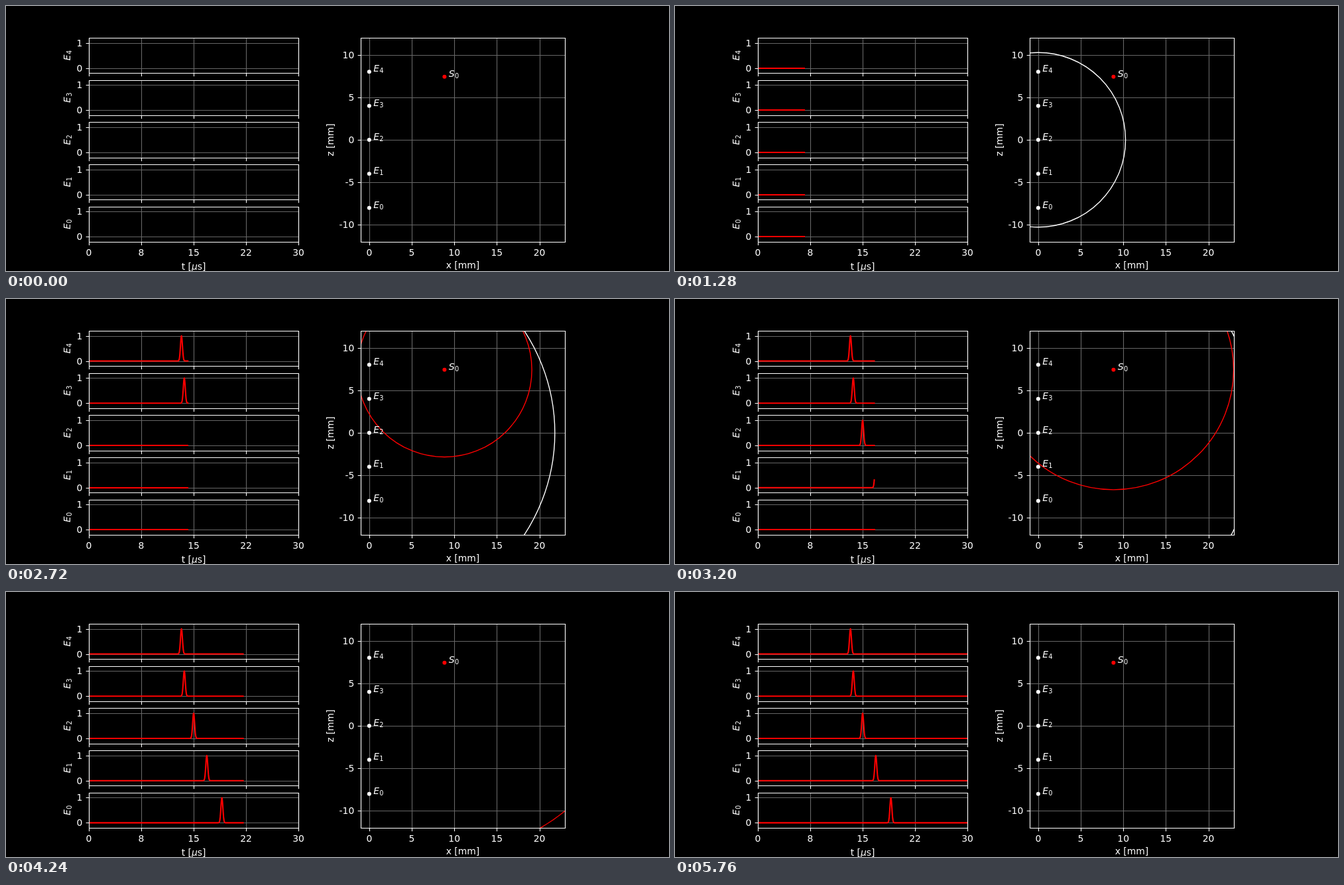
Recreate the animation shown at these times as an HTML page. Size 1000 by 400 pixels, loop 8000 ms.

```html
<!DOCTYPE html>
<html lang="en">
<head>
<meta charset="utf-8">
<title>Echo from a scatterer</title>
<style>
  html, body { margin: 0; width: 100%; height: 100%; overflow: hidden; background: #000; }
  svg { display: block; width: 1000px; height: 400px; }
  text { font: 13.89px "DejaVu Sans", sans-serif; fill: #fff; white-space: pre; }
  .var { font-style: italic; }
  .sub { font-size: 9.72px; }
  .grid, .axis { fill: none; stroke: #666; stroke-width: 1.11; }
  .axis { stroke: #fff; }
  .trace { fill: none; stroke: #f00; stroke-width: 2.08; stroke-linecap: square; stroke-linejoin: round; }
  .wave { fill: none; stroke-width: 1.39; }
</style>
</head>
<body>
<svg id="stage" viewBox="0 0 1000 400"></svg>
<script>
const FRAME = 40, LOOP = 8000, STEPS = 144;
const DURATION = 30;      // µs
const SPEED = 1.54;       // mm/µs
const PULSE = 0.14;       // µs, standard deviation
const TICK = 4.86, PAD = 9.72;

const stage = document.getElementById('stage');

function add(tag, attrs, parent = stage) {
  const node = document.createElementNS('http://www.w3.org/2000/svg', tag);
  for (const key in attrs) node.setAttribute(key, attrs[key]);
  parent.appendChild(node);
  return node;
}

function label(content, x, y, anchor = 'middle', rotated = false) {
  const node = add('text', { x, y, 'text-anchor': anchor });
  if (rotated) node.setAttribute('transform', `rotate(-90 ${x} ${y})`);
  node.innerHTML = content;
  return node;
}

const symbol = (letter, index) =>
  `<tspan class="var">${letter}</tspan><tspan class="sub" dx="0.3" dy="2.2">${index}</tspan>`;

const snap = v => Math.floor(v + 0.5) + 0.5;

function clip(id, x, y, w, h) {
  add('rect', { x, y, width: w, height: h }, add('clipPath', { id }));
}

// Draws grid, then an empty layer for the data, then frame and ticks.
function axes(id, x, y, w, h, xTicks, yTicks) {
  const left = snap(x), right = snap(x + w), top = snap(y), bottom = snap(y + h);
  let grid = '', frame = `M${left} ${top}H${right}V${bottom}H${left}Z`;
  for (const tx of xTicks.map(snap)) {
    grid += `M${tx} ${top}V${bottom}`;
    frame += `M${tx} ${bottom}v${TICK}`;
  }
  for (const ty of yTicks.map(snap)) {
    grid += `M${left} ${ty}H${right}`;
    frame += `M${left} ${ty}h${-TICK}`;
  }
  clip(id, x, y, w, h);
  add('path', { class: 'grid', d: grid });
  const layer = add('g', { 'clip-path': `url(#${id})` });
  add('path', { class: 'axis', d: frame });
  return layer;
}

const yTickLabel = (content, x, y) => label(content, x - PAD, Math.round(y + 5), 'end');

// Scene in mm: five receivers on the z axis, one scatterer.
const range = 7.5 * SPEED, angle = 40 * Math.PI / 180;
const scatterer = { x: range * Math.cos(angle), z: range * Math.sin(angle) };
const receivers = [0, 1, 2, 3, 4].map(i => ({ i, z: 4 * i - 8 }));

// Signal plots
const T0 = 125, TW = 316, PLOT_H = 308 / 5.8;
const timeX = t => T0 + TW * t / DURATION;
const times = [0, 7.5, 15, 22.5, 30];

for (const r of receivers) {
  const top = 48 + (4 - r.i) * PLOT_H * 1.2;
  r.y = v => top + PLOT_H * (1.2 - v) / 1.4;
  r.arrival = (range + Math.hypot(scatterer.x, scatterer.z - r.z)) / SPEED;
  const layer = axes('signal' + r.i, T0, top, TW, PLOT_H, times.map(timeX), [r.y(0), r.y(1)]);
  r.trace = add('path', { class: 'trace' }, layer);
  yTickLabel('0', T0, r.y(0));
  yTickLabel('1', T0, r.y(1));
  label(symbol('E', r.i), 97, top + PLOT_H / 2, 'middle', true);
}
['0', '8', '15', '22', '30'].forEach((s, i) => label(s, timeX(times[i]), 377));
label('t [<tspan class="var">μ</tspan>s]', 283, 398);

// Map
const SCALE = 308 / 24;
const mapX = x => 535 + (x + 1) * SCALE;
const mapY = z => 202 - z * SCALE;
const xs = [0, 5, 10, 15, 20], zs = [-10, -5, 0, 5, 10];
const map = axes('map', 535, 48, 308, 308, xs.map(mapX), zs.map(mapY));
const wave = (x, z, stroke) => add('circle', { class: 'wave', cx: mapX(x), cy: mapY(z), r: 0, stroke }, map);
const pulse = wave(0, 0, '#fff');
const echo = wave(scatterer.x, scatterer.z, '#f00');

xs.forEach(x => label(x, mapX(x), 377));
zs.forEach(z => yTickLabel(z, 535, mapY(z)));
label('x [mm]', 689, 396);
label('z [mm]', 494, 202, 'middle', true);

function point(x, z, fill, letter, index) {
  add('circle', { cx: mapX(x), cy: mapY(z), r: 3, fill });
  label(symbol(letter, index), mapX(x + 0.5), Math.round(mapY(z)), 'start');
}
receivers.forEach(r => point(0, r.z, '#fff', 'E', r.i));
point(scatterer.x, scatterer.z, '#f00', 'S', 0);

function tracePath(r, t) {
  if (t === 0) return '';
  // Flat lines sit on whole pixels.
  if (t < r.arrival - 0.65) return `M${T0} ${Math.round(r.y(0))}H${Math.round(timeX(t))}`;
  let d = `M${T0} ${r.y(0)}`;
  const to = s => {
    const v = Math.exp(-(((s - r.arrival) / PULSE) ** 2) / 2);
    d += `L${timeX(s).toFixed(2)} ${r.y(v).toFixed(2)}`;
  };
  const end = Math.min(t, r.arrival + 0.75);
  for (let s = r.arrival - 0.75; s < end; s += 0.03) to(s);
  to(end);
  to(t);
  return d;
}

function render(step) {
  const t = DURATION * step / STEPS, reach = SPEED * t;
  pulse.setAttribute('r', reach * SCALE);
  echo.setAttribute('r', Math.max(0, reach - range) * SCALE);
  for (const r of receivers) r.trace.setAttribute('d', tracePath(r, t));
}

let shown = -1;
function tick() {
  const step = Math.min(STEPS, Math.floor(performance.now() % LOOP / FRAME));
  if (step !== shown) render(shown = step);
  requestAnimationFrame(tick);
}
tick();
</script>
</body>
</html>
```
